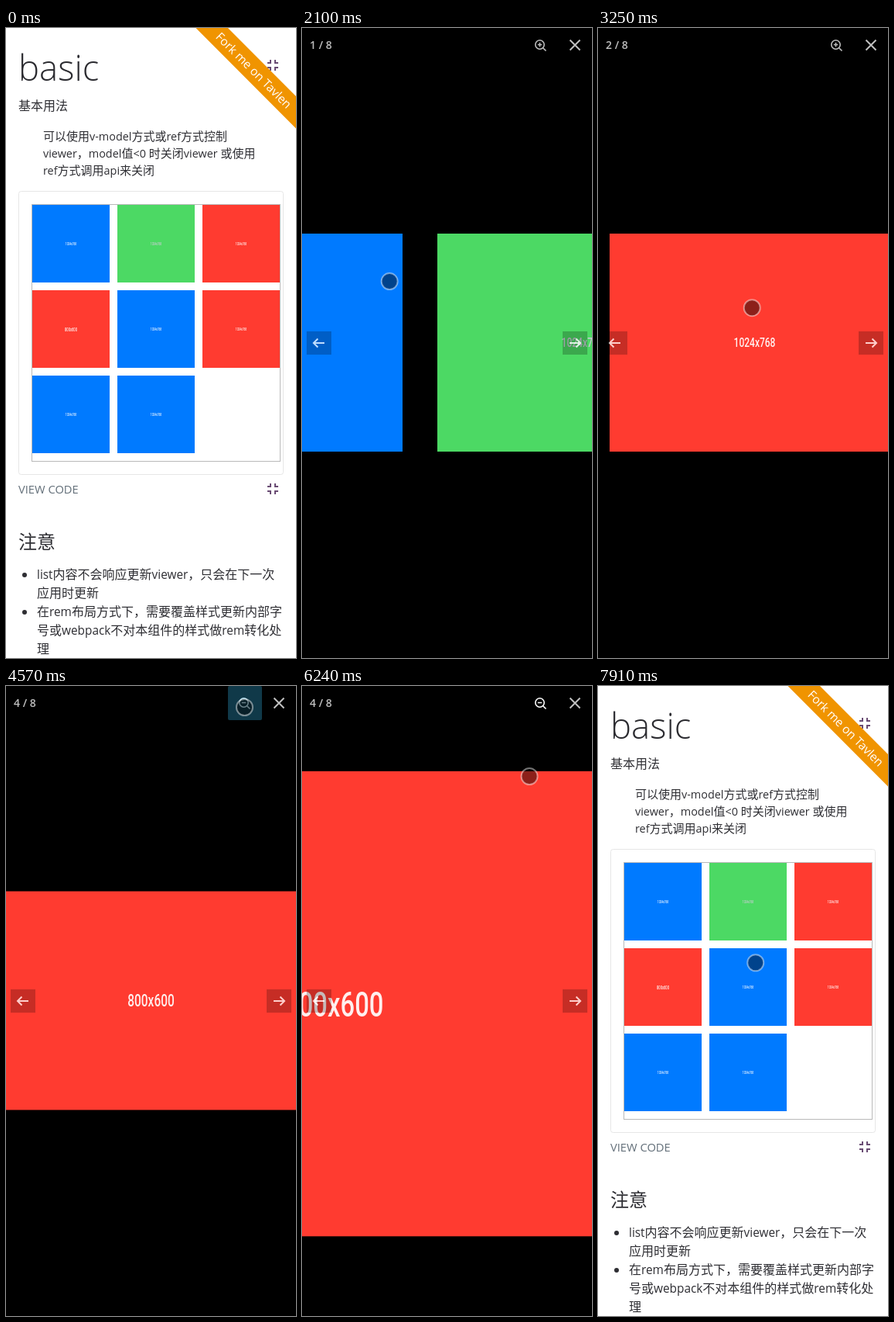
Recreate the animation shown at these times as an HTML page. Size 375x812 px, loop 8 s.

```html
<!DOCTYPE html>
<html lang="zh">
<head>
<meta charset="utf-8">
<title>basic</title>
<style>
html, body { margin: 0; width: 100%; height: 100%; overflow: hidden; background: #fff; }
svg { display: block; width: 375px; height: 812px; }
text { font-family: "Open Sans", "Noto Sans", "Noto Sans CJK SC", "Noto Sans CJK", sans-serif; white-space: pre; }
.label { font-family: Roboto, sans-serif; font-weight: 500; text-anchor: middle; }
.icon { fill: none; stroke: #fff; stroke-width: 2; }
</style>
</head>
<body>
<svg id="stage" viewBox="0 0 375 812" xmlns="http://www.w3.org/2000/svg"></svg>
<script>
const LOOP = 8000, W = 375, H = 812;
const FIT = 281, TOP = 265, STEP = W * 1.12;      // fitted picture height, its top, slide spacing
const OPEN = 1145, ZOOM = 4560, CLOSE = 7110;
const DRAG = 155, GLIDE = 460, SETTLE = 300, FADE = 333;
const BLUE = '#007aff', GREEN = '#4cd964', RED = '#ff3b30', INK = '#2e2e33';
const stage = document.getElementById('stage');

// ---- gestures: the pointer glides from each release to the next press ----
const tap = (at, x, y, hold) => ({ at, end: at + hold, x, y, dx: 0, dy: 0 });
const drag = (at, x, y, dx, dy) => ({ at, end: at + DRAG, x, y, dx, dy });

const enter = tap(0, 302, 823, 150);
const openTap = tap(1070, 111, 262, 240);
const swipes = [
  drag(1930, 326, 290, -214, 36),
  drag(2921, 340, 340, -210, 5),
  drag(3536, 347, 393, -214, -30)
];
const zoomTap = tap(4360, 308, 27, 960);
const pan = drag(5827, 318, 233, -113, 29);
const closeTap = tap(6950, 353, 18, 200);
const leave = drag(7770, 214.5, 319.5, -11.5, 37.5);
const gestures = [enter, openTap, ...swipes, zoomTap, pan, closeTap, leave];

// ---- markup ----
const rect = (x, y, w, h, attrs) => `<rect x="${x}" y="${y}" width="${w}" height="${h}" ${attrs}/>`;

// Latin runs are set slightly smaller than the Chinese around them
function text(x, y, size, str) {
  const body = str.replace(/</g, '&lt;')
    .replace(/(?:&lt;|[\w-])+/g, run => `<tspan font-size="${size * 0.96}">${run}</tspan>`);
  return `<text x="${x}" y="${y}" font-size="${size}" fill="${INK}">${body}</text>`;
}

const lines = (x, y, size, gap, list) => list.map((s, i) => text(x, y + i * gap, size, s)).join('');

// placeholder picture at fitted size
function picture(color, i) {
  const width = i === 3 ? 800 : 1024;
  const size = 45 * W / width;
  return rect(0, 0, W, FIT, `fill="${color}"`) +
    `<g transform="translate(${W / 2} ${FIT / 2 + size * 0.355}) scale(.73 1)">` +
    `<text class="label" font-size="${size}" fill="${color === GREEN ? '#d3cbdc' : '#fff'}" fill-opacity=".92">` +
    `${width}x${width * 0.75}</text></g>`;
}

const pictures = [BLUE, GREEN, RED, RED, BLUE, RED, BLUE, BLUE].map(picture);

const thumbs = pictures.map((p, i) =>
  `<g transform="translate(${34 + i % 3 * 110} ${228 + Math.floor(i / 3) * 110}) scale(${100 / W} ${100 / FIT})">${p}</g>`
).join('');

// four corner brackets around (345, y)
const shrinkIcon = y => [0, 90, 180, 270].map(a =>
  `<path transform="translate(345 ${y}) rotate(${a})" fill="#6a4c74" d="M-7 -4H-4V-7H-2V-2H-7Z"/>`).join('');

const page = `
  ${rect(0, 0, W, H, 'fill="#fff"')}
  <text x="16" y="68" font-size="45.500" font-weight="350" fill="#2b2b30">basic</text>
  ${shrinkIcon(48)}
  ${text(16, 106, 16, '基本用法')}
  ${lines(48, 144.5, 15, 22.4, [
    '可以使用v-model方式或ref方式控制',
    'viewer，model值<0 时关闭viewer 或使用',
    'ref方式调用api来关闭'])}
  ${rect(16.5, 210.5, 342, 365, 'rx="3" fill="none" stroke="#e6e6e6"')}
  ${rect(33.5, 227.5, 321, 331, 'fill="none" stroke="#b9b9b9"')}
  ${thumbs}
  <text x="16" y="600" font-size="14.700" fill="#64707a">VIEW CODE</text>
  ${shrinkIcon(594)}
  ${text(16, 671, 24, '注意')}
  ${[705, 753].map(y => `<circle cx="24" cy="${y}" r="3" fill="${INK}"/>`).join('')}
  ${lines(40, 710, 16, 24, [
    'list内容不会响应更新viewer，只会在下一次',
    '应用时更新',
    '在rem布局方式下，需要覆盖样式更新内部字',
    '号或webpack不对本组件的样式做rem转化处',
    '理'])}
  <path d="M245.500 0H287L375 88V129.500Z" fill="#f09400"/>
  <text transform="translate(320 55) rotate(45)" y="5" font-size="15.400" text-anchor="middle" fill="#fff">Fork me on Tavlen</text>`;

const arrow = (x, dir) => `<g opacity=".75" transform="translate(${x} 406) scale(${dir} 1)">
  ${rect(-16, -15, 32, 30, 'fill-opacity=".3"')}
  <path class="icon" d="M-7 0H6M1.500 -5.500L7 0L1.500 5.500"/></g>`;

const viewer = `
  <g id="shade">${rect(0, 0, W, H, '')}${rect(0, 0, W, 44, 'fill-opacity=".4"')}</g>
  ${pictures.slice(0, 4).map((p, i) => `<g id="slide${i}">${p}</g>`).join('')}
  <g id="ui">
    <text id="count" x="10" y="27" font-size="14" font-weight="600" fill="#fff" fill-opacity=".75"></text>
    <g id="lens" class="icon" style="stroke-width:1.6" transform="translate(307.500 21.500)">
      <circle r="5.700"/>
      <path d="M4.200 4.200L8 8M-2.700 0H2.700"/>
      <path id="plus" d="M0 -2.700V2.700"/>
    </g>
    <path class="icon" opacity=".75" d="M346.500 15.500L359.500 28.500M359.500 15.500L346.500 28.500"/>
    ${arrow(22, -1)}${arrow(353, 1)}
  </g>`;

stage.innerHTML = `${page}<g id="viewer">${viewer}</g>
  <rect id="flash" rx="2" fill="#33b5e5"/>
  <circle id="cursor" r="10.500" fill-opacity=".45" stroke="#fff" stroke-opacity=".45" stroke-width="2"/>`;

const el = {};
stage.querySelectorAll('[id]').forEach(n => el[n.id] = n);

// ---- motion ----
const span = (t, a, length) => Math.max(0, Math.min(1, (t - a) / length));
const sine = p => 0.5 - Math.cos(Math.PI * p) / 2;
const cubicOut = p => 1 - (1 - p) ** 3;

// cubic-bezier(.4, 0, .22, 1), solved by bisection
function fade(p) {
  let lo = 0, hi = 1, u = p;
  for (let i = 0; i < 16; i++) {
    u = (lo + hi) / 2;
    const x = 3 * (1 - u) ** 2 * u * 0.4 + 3 * (1 - u) * u * u * 0.22 + u ** 3;
    if (x < p) lo = u; else hi = u;
  }
  return u * u * (3 - 2 * u);
}

const pull = (g, t) => sine(span(t, g.at, g.end - g.at));

function pointer(t) {
  const i = gestures.findLastIndex(g => t >= g.at);
  const g = gestures[i], next = gestures[i + 1], p = pull(g, t);
  const x = g.x + g.dx * p, y = g.y + g.dy * p;
  if (!next) return [x, y];
  const q = sine(span(t, g.end, GLIDE));
  return [x + (next.x - x) * q, y + (next.y - y) * q];
}

function scroll(t) {
  let x = 0, index = 0;
  for (const g of swipes) {
    const pulled = g.dx * pull(g, t);
    x += pulled - (STEP + pulled) * cubicOut(span(t, g.end, SETTLE));
    if (t >= g.end + SETTLE) index++;
  }
  return { x: Math.round(x), index };
}

// the fourth picture zooms to its real size, is dragged, then glides to rest
function zoomed(t) {
  const s = 1 + (800 / W - 1) * sine(span(t, ZOOM, FADE));
  const p = pull(pan, t), rest = Math.max(0, t - pan.end);
  const x = (1 - s) * W / 2 + pan.dx * p - 39.5 * (1 - Math.exp(-rest / 140));
  const y = TOP + (1 - s) * FIT / 2 + pan.dy * 0.35 * p * Math.exp(-rest / 282);
  return [x, y, s];
}

const place = (node, x, y, s = 1) => node.setAttribute('transform', `translate(${x} ${y}) scale(${s})`);
const show = (node, on) => node.style.display = on ? '' : 'none';

const targets = [
  { tap: openTap, x: 34, y: 228, size: 100 },
  { tap: zoomTap, x: 287, y: 0, size: 44 },
  { tap: closeTap, x: 331, y: 0, size: 44 }
];

function drawFlash(t) {
  const hit = targets.findLast(b => t >= b.tap.at);
  show(el.flash, hit);
  if (!hit) return;
  place(el.flash, hit.x, hit.y);
  el.flash.setAttribute('width', hit.size);
  el.flash.setAttribute('height', hit.size);
  el.flash.setAttribute('opacity', 0.4 * (1 - span(t, hit.tap.at + 180, 150)));
}

function draw(t) {
  show(el.viewer, t >= OPEN && t < CLOSE);
  el.shade.setAttribute('opacity', fade(span(t, OPEN + 13, FADE)));
  el.ui.setAttribute('opacity', fade(span(t, openTap.at, FADE)));

  const { x, index } = scroll(t);
  for (let i = 0; i < 3; i++) place(el['slide' + i], x + i * STEP, TOP);
  const [zx, zy, s] = zoomed(t);
  place(el.slide3, x + 3 * STEP + zx, zy, s);

  el.count.textContent = `${index + 1} / 8`;
  show(el.plus, t < ZOOM);
  el.lens.setAttribute('opacity', t < zoomTap.at ? 0.75 : 1);

  drawFlash(t);
  show(el.cursor, t >= 110);
  const [cx, cy] = pointer(t);
  place(el.cursor, cx + 0.5, cy + 0.5);
}

const start = performance.now();
function tick() {
  draw((performance.now() - start) % LOOP);
  requestAnimationFrame(tick);
}
tick();
</script>
</body>
</html>
```
